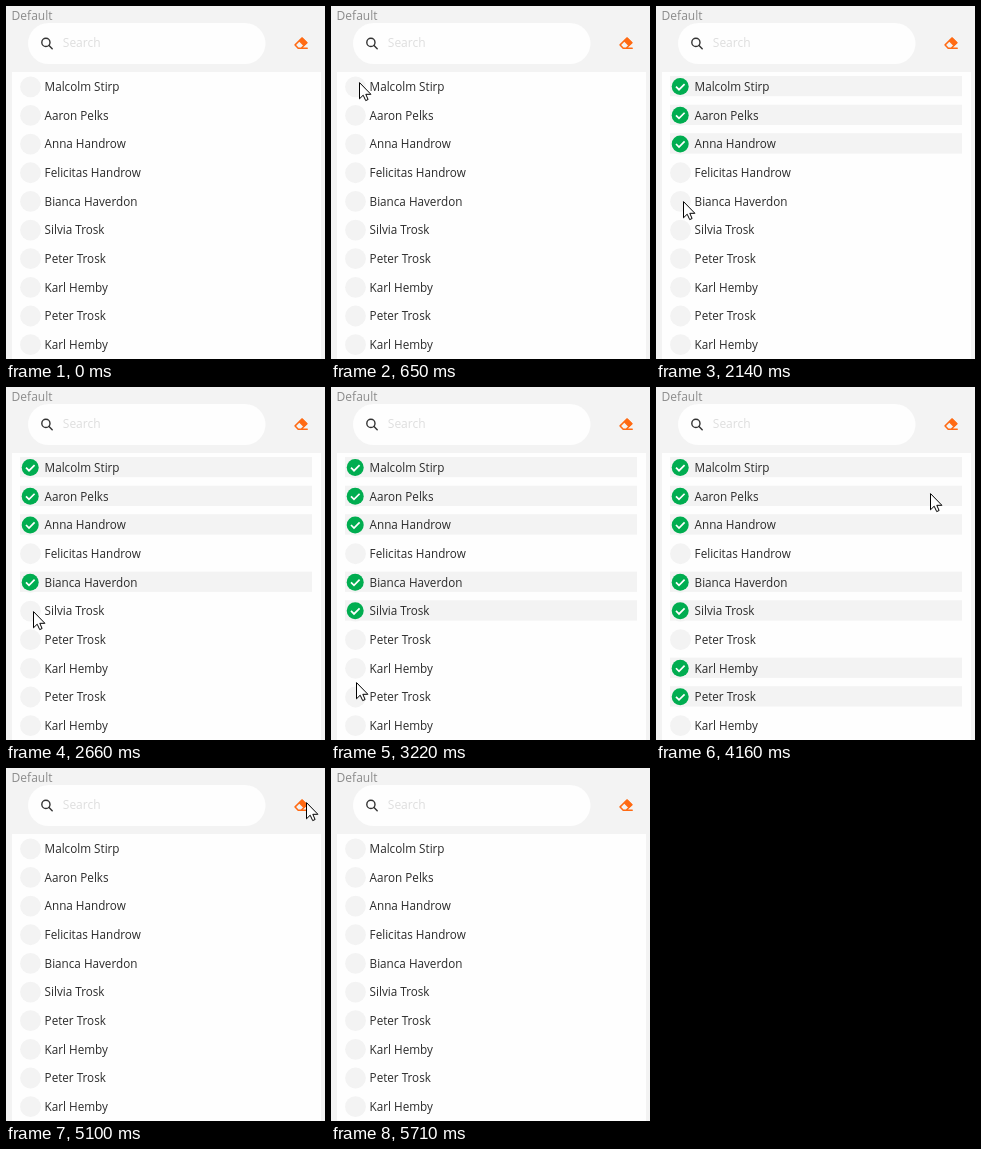
These frames come from a looping animation (319 px wide and 353 px high, 6.23 s). An HTML page:

```html
<!DOCTYPE html>
<html lang="en">
<head>
<meta charset="utf-8">
<title>Contact list</title>
<style>
  html, body { margin: 0; width: 100%; height: 100%; overflow: hidden; background: #f3f3f3; }
  svg { display: block; width: 319px; height: 353px; }
  text { font: 11.7px "Open Sans", "Noto Sans", sans-serif; fill: #2b2b2b; }
</style>
</head>
<body>
<svg viewBox="0 0 319 353">
  <text x="5.6" y="13.6" style="fill:#8b8b8b; font-size:12px">Default</text>
  <rect x="22" y="17" width="237.5" height="41" rx="20.5" fill="#fefefe"/>
  <g fill="none" stroke="#333" stroke-width="1.4" stroke-linecap="round">
    <circle cx="39.9" cy="36.4" r="4.1"/>
    <path d="M43 39.6L46.2 42.8"/>
  </g>
  <text x="56.8" y="41.4" style="fill:#dedede; font-size:12px">Search</text>
  <g stroke="#ff6a13" stroke-width="1.5" stroke-linejoin="round" stroke-linecap="round">
    <path fill="none" d="M296 32L289.1 38.9L292.2 42.3H301.2M295.2 42.3L300.8 36.8L296 32"/>
    <path fill="#ff6a13" d="M293.6 35L296.2 32.2L300.7 36.7L297.8 39.2Z"/>
  </g>
  <rect x="6" y="66" width="309" height="287" fill="#fefefe"/>
  <g id="list"></g>
  <path id="cursor" d="M.5 .6V16.8L4.2 13.2L6.7 18.6L9.1 17.5L6.8 12.3H11.9Z" fill="#fff" stroke="#000"/>
</svg>
<script>
const LOOP = 6230, CLEAR = 5100, HIDE = 5710;
const TOP = 66.5, PITCH = 28.65;

const names = [
  "Malcolm Stirp", "Aaron Pelks", "Anna Handrow", "Felicitas Handrow", "Bianca Haverdon",
  "Silvia Trosk", "Peter Trosk", "Karl Hemby", "Peter Trosk", "Karl Hemby"
];

// Where the cursor arrives, and how long it rests before it clicks and moves on
const stops = [
  { at: 270, rest: 0, x: 20, y: 134 },
  { at: 650, rest: 230, x: 28, y: 76 },
  { at: 1210, rest: 180, x: 27, y: 114 },
  { at: 1640, rest: 320, x: 27, y: 139 },
  { at: 2140, rest: 280, x: 27, y: 195 },
  { at: 2660, rest: 230, x: 27, y: 224 },
  { at: 3220, rest: 240, x: 25, y: 295 },
  { at: 3550, rest: 330, x: 25, y: 308 },
  { at: 4160, rest: 0, x: 274, y: 106 },
  { at: 4490, rest: 940, x: 300, y: 34 },
  { at: 5670, rest: 0, x: 46, y: 295 }
];

const list = document.getElementById("list");
const cursor = document.getElementById("cursor");
const show = (el, on) => { el.style.display = on ? "" : "none"; };
const leave = s => s.at + s.rest;
const rowAt = y => Math.floor((y - TOP) / PITCH);

list.innerHTML = names.map((name, i) => `
  <g transform="translate(0 ${TOP + i * PITCH})">
    <circle cx="24.5" cy="14.3" r="10.4" fill="#f3f3f3"/>
    <g class="tick">
      <rect x="14" y="3.5" width="292" height="20.3" fill="#f3f3f3"/>
      <circle cx="24.2" cy="14.1" r="8.5" fill="#00ad50"/>
      <path d="M20 14.2L23 17.2L28.6 11.6" fill="none" stroke="#fff" stroke-width="1.7"/>
    </g>
    <text x="38.6" y="18.5">${name}</text>
  </g>`).join("");
const ticks = list.querySelectorAll(".tick");

// A rest over a row ends with a click on that row
const clicks = names.map((_, i) => {
  const stop = stops.find(s => s.rest && rowAt(s.y) === i);
  return stop ? leave(stop) : Infinity;
});

function cursorAt(t) {
  const i = stops.findLastIndex(s => s.at <= t);
  const from = stops[Math.max(i, 0)];
  const to = stops[i + 1] || from;
  const u = Math.max(0, (t - leave(from)) / (to.at - leave(from) || 1));
  const k = to === from ? 0 : u * u * (3 - 2 * u);
  return [from.x + (to.x - from.x) * k, from.y + (to.y - from.y) * k];
}

function draw(t) {
  ticks.forEach((tick, i) => show(tick, t >= clicks[i] && t < CLEAR));
  const [x, y] = cursorAt(t).map(Math.round);
  cursor.setAttribute("transform", `translate(${x} ${y})`);
  show(cursor, t >= stops[0].at && t < HIDE);
}

const start = performance.now();
function loop(now) {
  draw(Math.max(0, now - start) % LOOP);
  requestAnimationFrame(loop);
}
draw(0);
requestAnimationFrame(loop);
</script>
</body>
</html>
```
